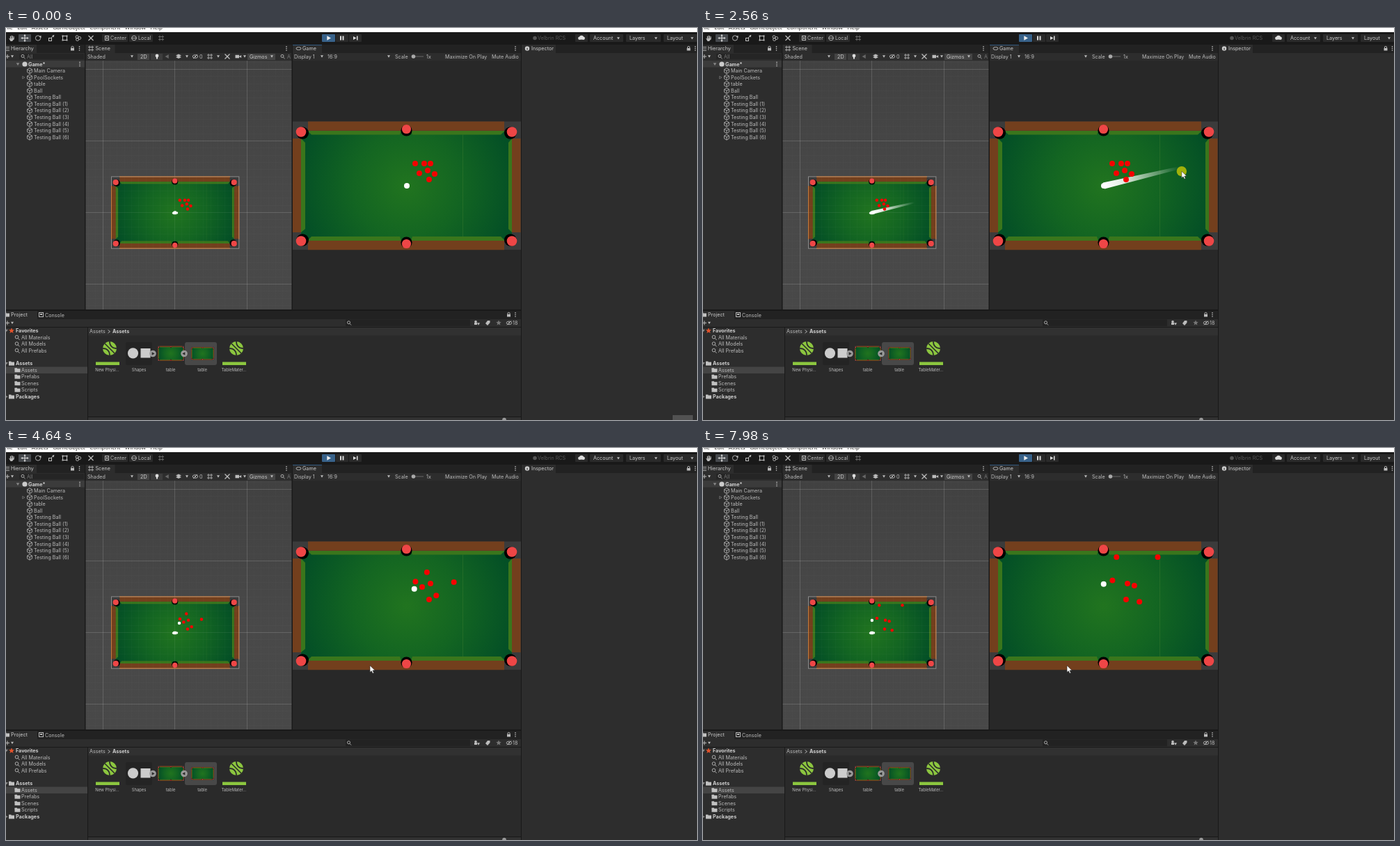
An HTML page with a canvas for the animation above (8 s loop, 993 by 564 pixels).

```html
<!DOCTYPE html>
<html lang="en">
<head>
<meta charset="utf-8">
<title>Pool table editor</title>
<style>
html, body { margin: 0; width: 100%; height: 100%; overflow: hidden; background: #191919; }
canvas { display: block; }
</style>
</head>
<body>
<canvas id="stage" width="993" height="564"></canvas>
<script>
const W = 993, H = 564, LOOP = 8000;
const ENTER = 30, ARRIVE = 650, PRESS = 1220, ORBIT = 2050, RELEASE = 4170;
const PANEL = '#2d2d2d', BAR = '#222', EDGE = '#191919', BUTTON = '#2a2a2a', INK = '#bcbcbc';
const stage = document.getElementById('stage').getContext('2d');
const backdrop = document.createElement('canvas');
backdrop.width = W;
backdrop.height = H;
let c = backdrop.getContext('2d');

// ---- drawing helpers ----
function box(x, y, w, h, color, radius = 0) {
  c.fillStyle = color;
  c.beginPath();
  c.roundRect(x, y, w, h, radius);
  c.fill();
}
function frameBox(x, y, w, h, color = INK) {
  c.strokeStyle = color;
  c.lineWidth = 1;
  c.strokeRect(x, y, w, h);
}
function disc(x, y, r, color) {
  c.fillStyle = color;
  c.beginPath();
  c.arc(x, y, r, 0, Math.PI * 2);
  c.fill();
}
function ring(x, y, rx, ry = rx, color = INK, width = 0.9) {
  c.strokeStyle = color;
  c.lineWidth = width;
  c.beginPath();
  c.ellipse(x, y, rx, ry, 0, 0, Math.PI * 2);
  c.stroke();
}
function trace(points) {
  c.beginPath();
  for (let i = 0; i < points.length; i += 2) c.lineTo(points[i], points[i + 1]);
}
function poly(color, ...points) {
  trace(points);
  c.fillStyle = color;
  c.fill();
}
function line(color, width, ...points) {
  trace(points);
  c.strokeStyle = color;
  c.lineWidth = width;
  c.stroke();
}
function label(text, x, y, color = INK, size = 7.2, weight = 400) {
  c.font = `${weight} ${size}px Inter, sans-serif`;
  c.fillStyle = color;
  c.fillText(text, x, y + size * 0.36);
  return c.measureText(text).width;
}
const bold = (text, x, y) => label(text, x, y, '#d0d0d0', 7.2, 700);

// A regular polygon or star: every second corner sits at the inner radius.
function spokes(x, y, corners, outer, inner = outer, turn = -Math.PI / 2) {
  const points = [];
  for (let i = 0; i < corners; i++) {
    const a = turn + i * 2 * Math.PI / corners, r = i % 2 ? inner : outer;
    points.push(x + r * Math.cos(a), y + r * Math.sin(a));
  }
  return points;
}
const wedge = (x, y, turn = Math.PI / 2, r = 2.3, color = INK) =>
  poly(color, ...spokes(x, y, 3, r, r, turn));
const down = (x, y) => wedge(x, y - 0.5);
const star = (x, y, r, color) => poly(color, ...spokes(x, y, 10, r, r * 0.45));

// ---- icons ----
function dots(x, y) {
  for (let i = -1; i <= 1; i++) disc(x, y + i * 2.6, 0.8, INK);
}
function lock(x, y) {
  ring(x, y - 1.5, 1.7);
  box(x - 2.5, y - 0.6, 5, 3.6, INK);
}
function glass(x, y, r = 2) {
  ring(x, y - 0.6, r);
  line(INK, 0.9, x + r * 0.7, y + r * 0.5, x + r * 1.8, y + r * 1.6);
}
function plus(x, y) {
  line(INK, 1, x - 3, y, x + 3, y);
  line(INK, 1, x, y - 3, x, y + 3);
  down(x + 7, y);
}
function cube(x, y) {
  const corners = spokes(x, y, 6, 4);
  line(INK, 0.8, ...corners, corners[0], corners[1]);
  for (let i = 2; i < 12; i += 4) line(INK, 0.8, x, y, corners[i], corners[i + 1]);
}
function folder(x, y) {
  box(x - 4, y - 3, 3.5, 2, '#c2c2c2');
  box(x - 4, y - 2, 8, 5, '#c2c2c2');
}
function eye(x, y) {
  ring(x, y, 3.8, 2.3);
  disc(x, y, 1, INK);
  line(INK, 0.9, x - 3, y + 3, x + 3, y - 3);
}
function gridIcon(x, y, color = INK) {
  for (const d of [-2, 2]) {
    line(color, 0.8, x - 4, y + d, x + 4, y + d);
    line(color, 0.8, x + d, y - 4, x + d, y + 4);
  }
}
function tools(x, y) {
  for (const d of [-3.5, 3.5]) line(INK, 1.3, x - 3.5, y - d, x + 3.5, y + d);
}
function moveIcon(x, y) {
  line('#ddd', 1, x - 4, y, x + 4, y);
  line('#ddd', 1, x, y - 4, x, y + 4);
  for (let a = 0; a < 6; a += Math.PI / 2)
    wedge(x + 4 * Math.cos(a), y + 4 * Math.sin(a), a, 1.8, '#ddd');
}
function handIcon(x, y) {
  poly(INK, x - 4, y, x - 2, y + 1, x + 3, y, x + 3, y + 2, x + 1, y + 4.5, x - 1.5, y + 4.5);
  for (let i = 0; i < 4; i++) {
    const fx = x - 1.6 + i * 1.6;
    line(INK, 1.1, fx, y + 2, fx, y - 4 + Math.abs(i - 1.3));
  }
}

// Runs a drawing in game view coordinates, shrunk around another centre.
function placed(x, y, scale, paint) {
  c.save();
  c.translate(x, y);
  c.scale(scale, scale);
  c.translate(-576, -227);
  paint();
  c.restore();
}
const inScene = paint => placed(243, 265.6, 0.561, paint);

function table() {
  box(412, 134.5, 328, 184.5, '#3b3b3b');
  const felt = c.createRadialGradient(576, 227, 0, 576, 227, 155);
  felt.addColorStop(0, '#21741f');
  felt.addColorStop(0.5, '#136522');
  felt.addColorStop(1, '#045026');
  box(424, 148, 303, 158, felt);
  const brown = '#733f1d', cushion = '#3a761c', red = '#ee4646';
  for (const y of [134.5, 306]) box(434, y, 282, 13.3, brown);
  for (const x of [412, 727]) box(x, 159, 12.5, 135, brown);
  for (const [outer, inner] of [[148, 153.5], [306, 300]])
    for (const side of [-1, 1])
      poly(cushion, 575 + side * 7, outer, 575 + side * 142, outer,
        575 + side * 136, inner, 575 + side * 9, inner);
  for (const [outer, inner] of [[424, 430], [727, 722]])
    poly(cushion, outer, 159, inner, 165, inner, 289, outer, 294);
  line('rgba(60,125,50,.55)', 0.8, 656.5, 153.5, 656.5, 300);
  for (const sx of [-1, 0, 1])
    for (const sy of [-1, 1]) {
      const x = 575.5 + sx * 151.5, y = 228 + sy * (sx ? 78.5 : 82.5);
      disc(x - sx * 2.2, y - sy * (sx ? 1.5 : 2), sx ? 8.8 : 8.1, '#000');
      disc(x, y, sx ? 7.3 : 6.6, red);
    }
}

// ---- still parts of the window ----
function topBars() {
  box(0, 0, W, 6, '#fff');
  let x = -3;
  c.font = '8px "Open Sans", sans-serif';
  c.fillStyle = '#222';
  for (const text of ['File', 'Edit', 'Assets', 'GameObject', 'Component', 'Window', 'Help']) {
    c.fillText(text, x, 2);
    x += c.measureText(text).width + 6.5;
  }
  box(18, 9, 18, 11, '#46494d', 1);
  box(138, 9, 37, 11, BUTTON, 1);
  box(177, 9, 34, 11, BUTTON, 1);
  handIcon(8, 14.5);
  moveIcon(27, 14.5);
  ring(46, 14.5, 3.6);
  wedge(49.5, 12.5, 1, 2);
  frameBox(61.5, 14.5, 4, 4);
  line(INK, 1, 64, 15, 69, 10.5);
  wedge(68, 11.5, -Math.PI / 4, 2);
  frameBox(81.5, 11.5, 6, 6);
  for (const cx of [81.5, 87.5]) for (const cy of [11.5, 17.5]) box(cx - 1, cy - 1, 2, 2, INK);
  for (const a of [0, 2, 4]) ring(103.5 + 2.2 * Math.cos(a), 14.5 + 2.2 * Math.sin(a), 2);
  tools(122, 14.5);
  frameBox(142.5, 11.5, 5, 6);
  disc(145, 14.5, 1.2, INK);
  label('Center', 150, 14.8);
  ring(184, 14.5, 3.3);
  line(INK, 0.8, 180, 14.5, 188, 14.5);
  label('Local', 190, 14.8);
  gridIcon(223, 14.5, '#777');

  box(454, 9, 19, 11, '#38628a', 1);
  box(474, 9, 18, 11, BUTTON, 1);
  box(493, 9, 18, 11, BUTTON, 1);
  wedge(463.2, 14.5, 0, 3.8, '#eee');
  for (const bar of [480, 483.5]) box(bar, 11.5, 2, 6, '#ddd');
  wedge(500.5, 14.5, 0, 3, '#ddd');
  box(504, 11.5, 1.5, 6, '#ddd');

  disc(760, 14.5, 2.8, '#555');
  label('Velbrin RCS', 764, 14.8, '#585858');
  box(818, 9, 18, 11, BUTTON, 1);
  for (const d of [-1, 0, 1]) disc(827 + d * 2.7, 14.7 - (d ? 0 : 1), d ? 2.2 : 3, '#ddd');
  for (const [text, left, width] of [['Account', 839, 48], ['Layers', 891, 50], ['Layout', 945, 48]]) {
    box(left, 9, width, 11, BUTTON, 1);
    label(text, left + 5, 14.8, '#ccc');
    down(left + width - 7, 14.8);
  }
}

function panel(x, y, w, h, tabWidth, title, menuX) {
  box(x, y, w, h, PANEL);
  box(x, y, w, 12, BAR);
  box(x, y, tabWidth, 12, PANEL);
  label(title, x + (x > 100 ? 14 : 7), y + 5.8, '#ccc');
  dots(menuX, y + 5.5);
}

function hierarchy() {
  panel(0, 24, 113, 381, 44, 'Hierarchy', 105.5);
  for (let y = 27.5; y < 33; y += 2.5) line(INK, 0.8, 0, y, 5, y);
  lock(95.5, 29.5);
  plus(2, 41);
  box(19, 37, 93, 8, '#252525');
  glass(24, 41);
  label('All', 30, 41, '#777');
  box(0, 47, 113, 9.5, '#3b3b3b');
  wedge(17, 51.5, Math.PI / 2, 2.6, '#888');
  disc(27, 52, 3.6, '#ccc');
  bold('Game*', 32, 52);
  dots(106, 52);
  const rows = ['Main Camera', 'PoolSockets', 'table', 'Ball', 'Testing Ball'];
  for (let i = 1; i <= 6; i++) rows.push(`Testing Ball (${i})`);
  rows.forEach((text, i) => {
    const y = 61.6 + i * 9.55;
    cube(34, y);
    label(text, 40, y);
  });
  line('#777', 0.8, ...spokes(24.8, 71.2, 3, 2.2, 2.2, 0), 27, 71.2);
}

function sceneGrid(fine, coarse) {
  for (let i = -22; i <= 18; i++) {
    const color = `rgba(255,255,255,${i % 10 ? fine : coarse})`;
    const x = Math.floor(242.5 + i * 10.35) + 0.5, y = Math.floor(265.5 + i * 10.3) + 0.5;
    line(color, 1, x, 47, x, 405);
    line(color, 1, 114, y, 411, y);
  }
}

function sceneView() {
  panel(114.5, 24, 296, 23, 42, 'Scene', 403);
  gridIcon(122, 29.5);
  label('Shaded', 117, 41);
  for (const x of [181, 260, 305, 343]) down(x, 41);
  box(189, 37, 17, 9, '#444');
  label('2D', 193, 41, '#ccc');
  box(208, 37, 17, 9, '#3c3c3c');
  disc(217, 40, 2.4, '#ddd');
  box(216, 42, 2, 2.5, '#ddd');
  wedge(232, 41, Math.PI, 3.5, '#666');
  for (const y of [39.5, 42]) poly(INK, 244, y, 248, y - 2, 252, y, 248, y + 2);
  eye(272, 41);
  label('0', 278, 41);
  gridIcon(293, 41);
  tools(318, 41);
  box(329.5, 38.8, 5.5, 4.5, INK);
  wedge(337, 41, Math.PI, 2.4);
  box(347, 37, 40, 9, '#444');
  label('Gizmos', 350, 41, '#ccc');
  down(382, 41);
  glass(397, 41);
  label('A', 404, 41, '#777');

  c.save();
  c.beginPath();
  c.rect(114.5, 47, 296, 358);
  c.clip();
  const shade = c.createLinearGradient(0, 47, 0, 405);
  shade.addColorStop(0, '#414141');
  shade.addColorStop(0.6, '#494949');
  shade.addColorStop(1, '#484848');
  box(114, 47, 297, 358, shade);
  sceneGrid(0.015, 0.15);
  inScene(table);
  frameBox(151.5, 213.9, 183.3, 103.3, '#8c8c8c');
  for (const y of [213.9, 317.2]) line('#c77b3c', 1, 163, y, 322, y);
  for (const x of [151.5, 334.8]) line('#c77b3c', 1, x, 227, x, 304);
  c.beginPath();
  c.rect(152, 214, 183, 103);
  c.clip();
  sceneGrid(0.02, 0.07);
  c.restore();
}

function gameView() {
  panel(412, 24, 328, 23, 42, 'Game', 732);
  box(412, 24, 42, 1, '#31587e');
  ring(420.5, 29.5, 3.5, 2);
  label('Display 1', 414, 41);
  down(454, 41);
  label('16:9', 462, 41);
  down(550, 41);
  label('Scale', 559, 41);
  line('#666', 1, 583, 41, 600, 41);
  disc(585.5, 41, 2.8, '#aaa');
  label('1x', 604, 41);
  label('Maximize On Play', 631, 41);
  label('Mute Audio', 698, 41);
  box(412, 47, 328, 358, '#282828');
  table();
}

function inspector() {
  panel(741, 24, 252, 540, 49, 'Inspector', 990.5);
  disc(749, 29.5, 3.2, '#ccc');
  box(748.5, 28.8, 1.1, 2.8, PANEL);
  lock(981, 29.5);
}

function bouncyIcon(x, y) {
  const green = '#8cc63f';
  c.save();
  c.beginPath();
  c.arc(x, y, 10, 0, Math.PI * 2);
  c.clip();
  box(x - 10, y - 10, 20, 20, green);
  line(BUTTON, 1.6, x - 8, y - 8, x + 8, y + 8);
  for (const side of [-1, 1]) ring(x + side * 9, y - side * 9, 9, 9, BUTTON, 1.8);
  c.restore();
  box(x - 20, y + 19.5, 34, 4.5, green);
}
function foldButton(x, turn) {
  disc(x, 468.5, 4.8, '#9a9a9a');
  wedge(x, 468.5, turn, 2.6, '#2b2b2b');
}

function project() {
  panel(0, 407, 740, 157, 45, 'Project', 732);
  folder(1, 412.5);
  frameBox(47.5, 409.5, 6, 6);
  box(49, 411, 3, 2, INK);
  label('Console', 56, 413);
  lock(722.5, 412.5);
  plus(2, 424.3);
  box(488, 419.5, 179, 9.5, '#222');
  glass(492.5, 424.3);
  disc(675, 422.5, 1.8, INK);
  box(673, 424, 4, 3, INK);
  wedge(679, 425.5);
  poly(INK, 689, 425, 692, 421, 695.5, 421, 695.5, 424, 692, 428);
  star(708, 424.2, 4, '#777');
  eye(723, 424.3);
  label('18', 728, 424.3);
  line(EDGE, 1, 0, 430.5, 740, 430.5);
  line(EDGE, 1, 117.5, 431, 117.5, 564);
  box(118, 431, 622, 11.5, '#313131');
  box(118, 442.5, 622, 121.5, BUTTON);

  label('Assets', 120, 436.7);
  line(INK, 0.9, 146.5, 434.5, 149.5, 436.7, 146.5, 439);
  bold('Assets', 153, 436.7);

  star(8, 435.5, 4.3, '#e2532c');
  bold('Favorites', 14, 435.6);
  ['All Materials', 'All Models', 'All Prefabs'].forEach((text, i) => {
    glass(15.5, 445.2 + i * 9.5, 2.3);
    label(text, 22, 445.2 + i * 9.5);
  });
  box(0, 487.5, 117, 9.5, '#444');
  for (const [text, y] of [['Assets', 482.6], ['Packages', 530.5]]) {
    folder(8, y);
    bold(text, 14, y);
  }
  ['Assets', 'Prefabs', 'Scenes', 'Scripts'].forEach((text, i) => {
    folder(16.5, 492.2 + i * 9.5);
    label(text, 22, 492.2 + i * 9.5);
  });
  for (const y of [435.5, 482.6]) wedge(0.8, y - 0.5, Math.PI / 2, 2.3, '#888');
  wedge(0.5, 530.5, 0, 2.3, '#888');

  bouncyIcon(149, 461);
  bouncyIcon(331, 461);
  box(172, 452, 38, 33, '#242424', 2);
  disc(182.5, 467.8, 7.6, '#ccc');
  box(193.5, 461, 14, 13.5, '#ccc');
  box(257, 452, 46, 33, '#484848', 3);
  placed(237, 468.3, 0.116, table);
  placed(282.5, 468.3, 0.101, table);
  foldButton(211, 0);
  foldButton(256, Math.PI);
  ['New Physi...', 'Shapes', 'table', 'table', 'TableMater...'].forEach((text, i) => {
    c.textAlign = 'center';
    label(text, 145.5 + i * 45.5, 492.3, INK, 5.9);
    c.textAlign = 'left';
  });
  box(118, 559, 622, 5, '#313131');
  line(EDGE, 1, 118, 559.5, 740, 559.5);
  disc(716, 563.5, 2.8, '#999');
}

function paintBackdrop() {
  box(0, 0, W, H, EDGE);
  for (const part of [topBars, hierarchy, sceneView, gameView, inspector, project]) part();
}

// ---- balls: each leg is a new push [time, reach x, reach y] that dies away ----
const DRAG = 1900, BOUNCE_SPEED = 30, RIGHT = 717, TOP = 157;
const cue = { x: 576, y: 227, legs: [[RELEASE, 276, -470], [4240, 10, -46], [4540, -14, -9]] };
const reds = [
  { x: 588, y: 195, legs: [[4540, 7.5, -56]] },
  { x: 601, y: 195, legs: [[4270, 22, -92]] },
  { x: 594, y: 209, legs: [[4240, 32, -57], [4540, -12.3, -12.2]] },
  { x: 606, y: 205, legs: [[4250, 203, -65]] },
  { x: 616, y: 210, legs: [[4270, 13, 13]] },
  { x: 610, y: 195, legs: [] },
  { x: 608, y: 218, legs: [] }
];

// Fast balls rebound from a cushion, slow ones stay against it.
function glide(start, reach, part, wall) {
  const end = start + reach * part, hit = (wall - start) / reach;
  if (!(hit > 0 && hit < part)) return end;
  return Math.abs(reach) * (1 - hit) > BOUNCE_SPEED ? 2 * wall - end : wall;
}
function ballAt({ x, y, legs }, t) {
  legs.forEach(([start, dx, dy], i) => {
    const stop = Math.min(t, legs[i + 1]?.[0] ?? LOOP);
    if (stop <= start) return;
    const part = 1 - Math.exp((start - stop) / DRAG);
    x = glide(x, dx, part, RIGHT);
    y = glide(y, dy, part, TOP);
  });
  return [x, y];
}

// ---- mouse: enters, pulls back, then circles the cue ball ----
const orbit = [[ORBIT, 134, 0.965], [2180, 185, 0.7], [2560, 343.8, 1.04],
  [3100, 447.8, 1.14], [3800, 471.6, 1.284]];

const mix = (a, b, u) => a + (b - a) * u;
function ease(t, from, to) {
  const u = Math.min(1, Math.max(0, (t - from) / (to - from)));
  return u * u * (3 - 2 * u);
}
function slope(keys, i, k) {
  if (i <= 0 || i >= keys.length - 1) return 0;
  const rate = j => (keys[j + 1][k] - keys[j][k]) / (keys[j + 1][0] - keys[j][0]);
  const before = rate(i - 1), after = rate(i);
  return before * after > 0 ? 2 * before * after / (before + after) : 0;
}
function smooth(keys, t, k) {
  const next = keys.findIndex(key => key[0] > t);
  if (next < 0) return keys[keys.length - 1][k];
  const i = next - 1, span = keys[next][0] - keys[i][0], u = (t - keys[i][0]) / span, v = 1 - u;
  return mix(keys[i][k], keys[next][k], u * u * (3 - 2 * u))
    + span * u * v * (slope(keys, i, k) * v - slope(keys, next, k) * u);
}
function mouseAt(t) {
  if (t < PRESS) {
    const u = ease(t, ENTER, ARRIVE);
    return [mix(978, 547, u), mix(568, 239, u)];
  }
  if (t < ORBIT) {
    const u = ease(t, PRESS, 2010);
    return [mix(547, 501, u), mix(239, 277, u)];
  }
  const a = smooth(orbit, t, 1) * Math.PI / 180, r = smooth(orbit, t, 2);
  return [cue.x + 112 * r * Math.cos(a), cue.y + 72 * r * Math.sin(a)];
}

// ---- moving parts ----
const aiming = t => t >= PRESS && t < RELEASE;

function aimLine([x1, y1], [x2, y2]) {
  const length = Math.hypot(x2 - x1, y2 - y1) || 1;
  const nx = (y1 - y2) / length, ny = (x2 - x1) / length;
  const fade = c.createLinearGradient(x1, y1, x2, y2);
  fade.addColorStop(0, '#fff');
  fade.addColorStop(0.25, 'rgba(255,255,255,.88)');
  fade.addColorStop(1, 'rgba(255,255,255,0)');
  poly(fade, x1 + nx * 4.6, y1 + ny * 4.6, x2 + nx * 2, y2 + ny * 2,
    x2 - nx * 2, y2 - ny * 2, x1 - nx * 4.6, y1 - ny * 4.6);
}
function play(t) {
  const white = ballAt(cue, t);
  if (aiming(t)) aimLine(white, mouseAt(t - 15));
  for (const red of reds) disc(...ballAt(red, t), 4, '#f60000');
  disc(...white, 4, '#fff');
}
function cameraGizmo() {
  box(240.5, 263.8, 4.8, 4.4, '#fff');
  wedge(246, 266, Math.PI, 2, '#fff');
  disc(240.5, 266.2, 1.6, '#fff');
}
function pointer(t) {
  const [x, y] = mouseAt(t);
  if (aiming(t)) disc(x, y, 7.2, 'rgba(224,214,0,.7)');
  c.save();
  c.translate(x, y);
  const arrow = [0, 0, 0, 9.6, 2.2, 7.7, 3.9, 11.2, 5.5, 10.5, 3.9, 7.1, 7, 6.9, 0, 0];
  poly('#fff', ...arrow);
  line('#222', 0.5, ...arrow);
  c.restore();
}

let start;
function tick(now) {
  start ??= now;
  const t = (now - start) % LOOP;
  c.drawImage(backdrop, 0, 0);
  play(t);
  inScene(() => play(t));
  cameraGizmo();
  if (t < ENTER) box(958, 557, 29, 7, '#525252');
  else pointer(t);
  requestAnimationFrame(tick);
}

paintBackdrop();
c = stage;
requestAnimationFrame(tick);
</script>
</body>
</html>
```
